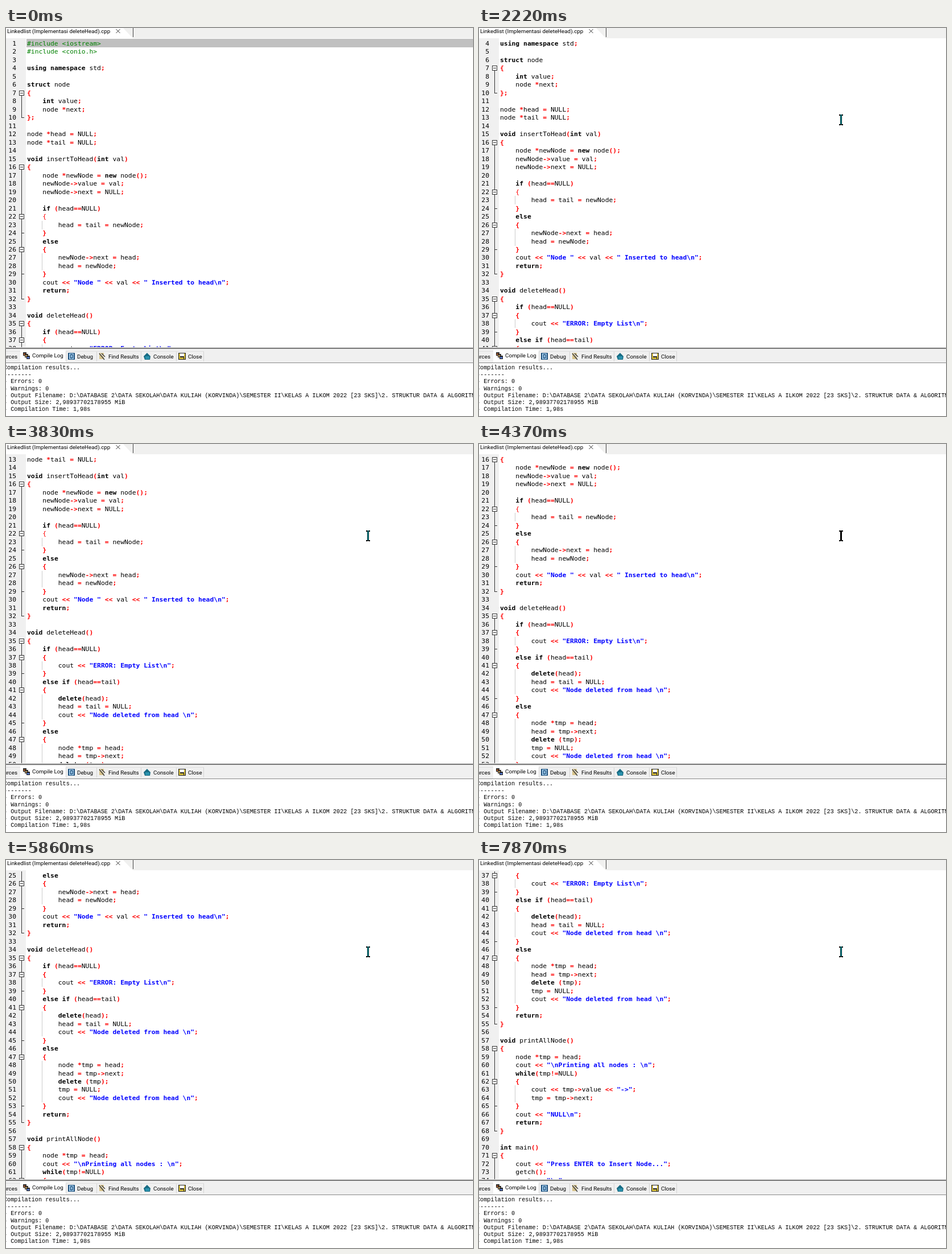
An HTML page with a canvas that plays this animation: 821x682 px, repeating every 8 s.

```html
<!DOCTYPE html>
<html>
<head>
<meta charset="utf-8">
<style>
  html, body { margin: 0; width: 100%; height: 100%; overflow: hidden; background: #fff; }
  canvas { display: block; }
</style>
</head>
<body>
<canvas id="stage" width="821" height="682"></canvas>
<script>
const ctx = document.getElementById('stage').getContext('2d');
const LOOP = 8000, CHAR = 6.84, LINE = 14.48, CODE_X = 37, FIRST_Y = 27, FOLD_X = 27;
const CODE_FONT = '11.36px "DejaVu Sans Mono", monospace';
const UI_FONT = '9.8px Roboto, sans-serif';
const LOG_FONT = '10.17px "Liberation Mono", monospace';
const KEYWORDS = new Set('using namespace struct int void new if else return delete while'.split(' '));

const code = String.raw`#include <iostream>
#include <conio.h>

using namespace std;

struct node
{
    int value;
    node *next;
};

node *head = NULL;
node *tail = NULL;

void insertToHead(int val)
{
    node *newNode = new node();
    newNode->value = val;
    newNode->next = NULL;

    if (head==NULL)
    {
        head = tail = newNode;
    }
    else
    {
        newNode->next = head;
        head = newNode;
    }
    cout << "Node " << val << " Inserted to head\n";
    return;
}

void deleteHead()
{
    if (head==NULL)
    {
        cout << "ERROR: Empty List\n";
    }
    else if (head==tail)
    {
        delete(head);
        head = tail = NULL;
        cout << "Node deleted from head \n";
    }
    else
    {
        node *tmp = head;
        head = tmp->next;
        delete (tmp);
        tmp = NULL;
        cout << "Node deleted from head \n";
    }
    return;
}

void printAllNode()
{
    node *tmp = head;
    cout << "\nPrinting all nodes : \n";
    while(tmp!=NULL)
    {
        cout << tmp->value << "->";
        tmp = tmp->next;
    }
    cout << "NULL\n";
    return;
}

int main()
{
    cout << "Press ENTER to Insert Node...";
    getch();
    cout << "\n";`.split('\n');

const log = String.raw`Compilation results...
--------
- Errors: 0
- Warnings: 0
- Output Filename: D:\DATABASE 2\DATA SEKOLAH\DATA KULIAH (KORVINDA)\SEMESTER II\KELAS A ILKOM 2022 [23 SKS]\2. STRUKTUR DATA & ALGORITMA
- Output Size: 2,98937702178955 MiB
- Compilation Time: 1,98s`.split('\n');

function tokenize(text, number) {
  if (text[0] === '#') return [{ col: 0, text, color: '#008000' }];
  return [...text.matchAll(/"[^"]*"|\w+|[^\s\w]+/g)].map(({ 0: word, index: col }) => {
    if (word[0] === '"') return { col, text: word, color: '#00f', bold: true };
    if (/\w/.test(word)) return { col, text: word, color: '#000', bold: KEYWORDS.has(word) };
    return { col, text: word, color: '#f00', bold: number !== 22 };
  });
}

// Each line knows its tokens and which parts of the fold column it needs.
let depth = 0;
const lines = code.map((text, i) => {
  const opens = text.trim() === '{', closes = text.trim()[0] === '}';
  const above = depth > 0;
  depth += opens - closes;
  return { tokens: tokenize(text, i + 1), opens, closes, above, below: depth > 0,
           guide: text.startsWith('        ') };
});

function rect(x, y, w, h, color) {
  ctx.fillStyle = color;
  ctx.fillRect(x, y, w, h);
}

function poly(color, ...points) {
  ctx.fillStyle = color;
  ctx.beginPath();
  points.forEach(([x, y]) => ctx.lineTo(x, y));
  ctx.fill();
}

function stroke(color, width, ...points) {
  ctx.strokeStyle = color;
  ctx.lineWidth = width;
  ctx.beginPath();
  points.forEach(([x, y], i) => i % 2 ? ctx.lineTo(x, y) : ctx.moveTo(x, y));
  ctx.stroke();
}

function label(text, x, y, font, color = '#000') {
  ctx.font = font;
  ctx.fillStyle = color;
  ctx.fillText(text, x, y);
}

function drawFold(line, y) {
  const top = y - 7, half = 7.5;
  if (line.above) rect(FOLD_X, top, 1, half, '#333');
  if (line.below) rect(FOLD_X, y, 1, half + 1, '#333');
  if (line.closes) rect(FOLD_X, y, 5, 1, '#333');
  if (line.opens) {
    rect(FOLD_X - 4, y - 4, 9, 9, '#333');
    rect(FOLD_X - 3, y - 3, 7, 7, '#fff');
    rect(FOLD_X - 2, y, 5, 1, '#333');
  }
}

function drawEditor(scroll) {
  ctx.save();
  ctx.beginPath();
  ctx.rect(0, 18, 821, 543);
  ctx.clip();
  rect(0, 18, 821, 543, '#fff');
  rect(0, 18, 35, 543, '#f0f0f0');
  if (scroll === 0) rect(36, 19, 785, 15, '#c0c0c0');
  for (let i = scroll; i < Math.min(lines.length, scroll + 38); i++) {
    const y = Math.round(FIRST_Y + (i - scroll) * LINE), line = lines[i];
    const number = String(i + 1);
    label(number, 18 - number.length * CHAR, y + 4, CODE_FONT);
    drawFold(line, y);
    if (line.guide) rect(63, y - 7, 1, 15, '#ccc');
    for (const { col, text, color, bold } of line.tokens) {
      label(text, CODE_X + col * CHAR, y + 4, (bold ? 'bold ' : '') + CODE_FONT, color);
    }
  }
  ctx.restore();
}

function drawFileTab() {
  rect(0, 0, 821, 18, '#f0f0ef');
  poly('#fff', [0, 0], [206, 0], [223, 18], [0, 18]);
  rect(223, 0, 1, 16, '#444');
  label('Linkedlist (Implementasi deleteHead).cpp', 2, 9, UI_FONT);
  stroke('#333', 1, [193.5, 2], [200.5, 9], [200.5, 2], [193.5, 9]);
}

function drawIcons() {
  for (const [x, y, color] of [[30, 570, '#b06030'], [33, 573, '#c8a060'], [36, 576, '#5070c0']]) {
    rect(x, y, 6, 6, '#222');
    rect(x + 1, y + 2, 4, 3, color);
  }
  rect(109, 571, 12, 12, '#1d4f7c');
  rect(111, 572, 8, 10, '#a8d0ee');
  stroke('#1d4f7c', 1.3, [113, 574], [117, 574], [113, 580], [117, 580], [113.5, 574], [113.5, 580], [117, 574], [117, 580]);

  rect(164, 571, 8, 11, '#d8c48c');
  stroke('#444', 1.5, [164, 572], [173, 583], [168, 572], [174, 578]);
  stroke('#fff', 1, [166, 572], [172, 578]);

  poly('#176b83', [242, 577], [248, 571], [254, 577], [253, 583], [244, 583]);
  rect(245, 577, 7, 5, '#2b93ae');

  rect(303, 571, 13, 12, '#222');
  rect(304, 572, 2, 10, '#d5bd3d');
  rect(313, 572, 2, 10, '#d5bd3d');
  rect(306, 572, 7, 5, '#fff');
  rect(306, 579, 6, 3, '#d5bd3d');
}

function drawPanel() {
  rect(0, 561, 821, 121, '#f0f0f0');
  rect(0, 562, 821, 2, '#777');
  rect(0, 588, 821, 94, '#fff');
  rect(0, 588, 821, 1, '#888');
  rect(25, 566, 80, 22, '#fff');
  for (const x of [105, 159, 237, 299, 347]) rect(x, 568, 1, 18, '#d4d4d4');
  rect(105, 568, 243, 1, '#dedede');
  rect(0, 568, 25, 1, '#dedede');
  ctx.textAlign = 'right';
  label('Resources', 20, 581, UI_FONT);
  ctx.textAlign = 'left';
  label('Compile Log', 46, 579, UI_FONT);
  [['Debug', 125], ['Find Results', 180], ['Console', 259], ['Close', 320]]
    .forEach(([text, x]) => label(text, x, 581, UI_FONT));
  drawIcons();
  log.forEach((text, i) => label(text, -4, Math.round(600 + i * 12.2), LOG_FONT));
}

// The wheel turns in pairs of three-line notches.
function scrollAt(t) {
  let notches = 0;
  for (let pair = 0; pair < 6; pair++) {
    const start = 1945 + pair * 1010;
    notches += (t >= start) + (t >= start + 470);
  }
  return notches * 3;
}

function drawPointer(t) {
  if (t < 780) return;
  const u = Math.min(1, (Math.floor((t - 780) / 70) + 1) / 12), v = u - 1;
  const sway = 1 + 1.95 * v ** 3 + 0.95 * v ** 2;
  const x = Math.round(800 - 164 * sway), y = Math.round(690 - 529 * (1 + v ** 3));
  rect(x - 3, y - 9, 3, 2, '#000');
  rect(x + 1, y - 9, 3, 2, '#000');
  rect(x - 3, y + 8, 3, 2, '#000');
  rect(x + 1, y + 8, 3, 2, '#000');
  rect(x - 1, y - 8, 3, 17, '#000');
  const lit = (t - 1610 + 2013) % 201.3 < 130;
  rect(x, y - 9, 1, 17, lit ? '#00e0f0' : '#000');
}

function render(t) {
  drawEditor(scrollAt(t));
  drawFileTab();
  drawPanel();
  drawPointer(t);
}

const begin = performance.now();
function frame() {
  render((performance.now() - begin) % LOOP);
  requestAnimationFrame(frame);
}
frame();
</script>
</body>
</html>
```
